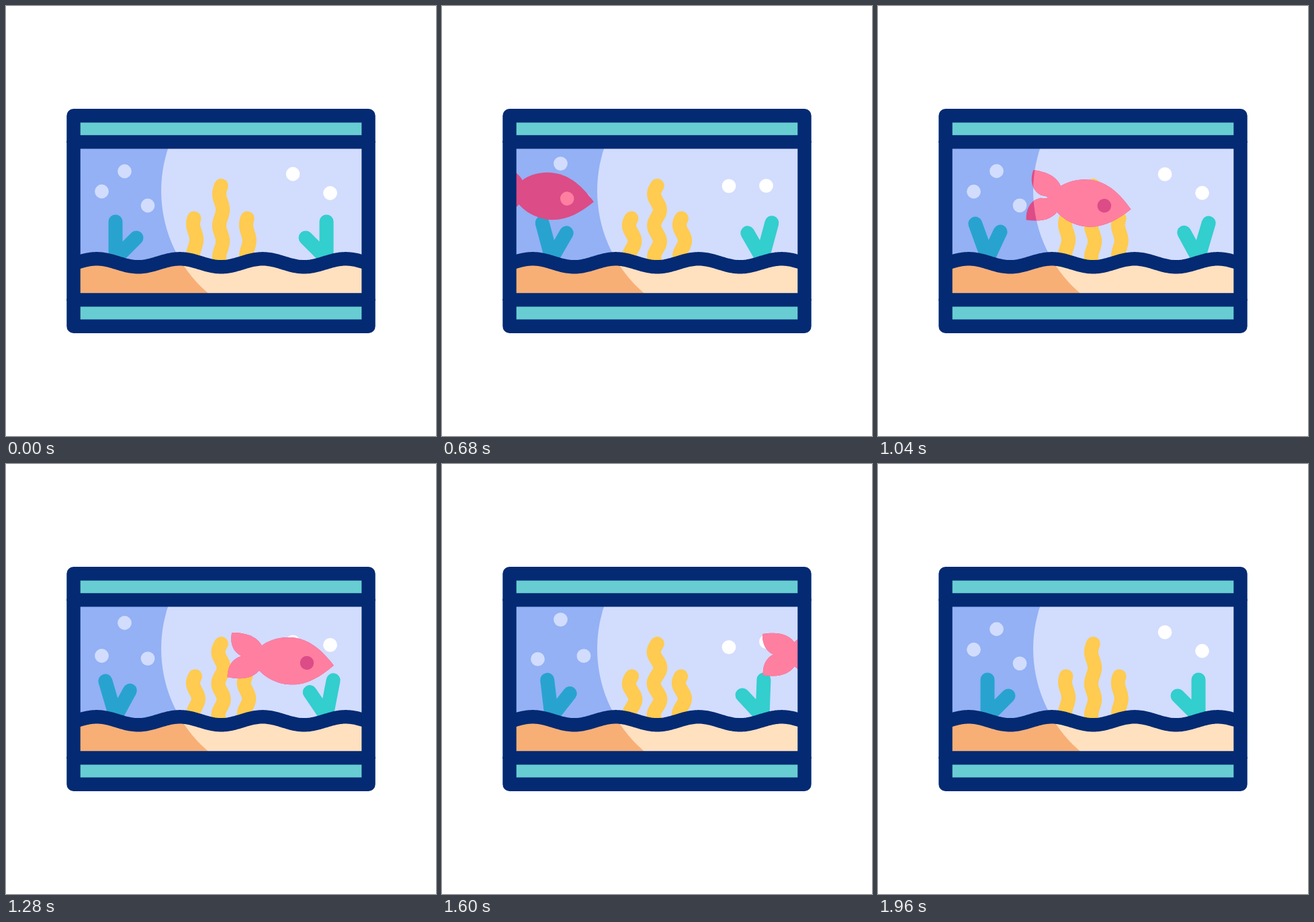
An HTML page with a canvas for the animation above (2 s loop, 640 by 640 pixels).

```html
<!DOCTYPE html>
<html lang="en">
<head>
<meta charset="utf-8">
<title>Aquarium</title>
<style>
html, body { margin: 0; width: 100%; height: 100%; overflow: hidden; background: #fff; }
canvas { display: block; }
</style>
</head>
<body>
<canvas id="stage" width="640" height="640"></canvas>
<script>
const ctx = document.getElementById('stage').getContext('2d');
const NAVY = '#032a73', TEAL = '#68cdd2', KELP = '#ffcb50';
const STEP = 40, STEPS = 50;

// x, rest y, travel, colour
const bubbles = [
  [176.5, 246, -16, '#d2dcfd'],
  [142.5, 276, 16, '#d2dcfd'],
  [211, 297, -12.5, '#d2dcfd'],
  [427, 250, 25, '#fff'],
  [482.5, 278.5, -15.3, '#fff']
];

const body = new Path2D('M60 0C40-21 20-35-5-35C-25-35-42-26-50-18Q-58-10-66 0Q-58 10-50 18C-42 26-25 35-5 35C20 35 40 21 60 0Z');
const lobe = new Path2D('M-95-34C-70-36-55-30-47-15L-40 0L-76 0C-90-4-97-17-95-34Z');

const lightZone = new Path2D();
lightZone.arc(433, 275, 202, 0, 7);

const ground = new Path2D();
for (let x = 96; x <= 544; x += 2) {
  ground.lineTo(x, 382.3 - 6 * Math.cos((x - 135) / 61.75 * Math.PI));
}
const sand = new Path2D(ground);
sand.lineTo(544, 440);
sand.lineTo(96, 440);

// 0 at the ends of a cycle, 1 in the middle
const swing = p => (1 - Math.cos(2 * Math.PI * Math.min(1, Math.max(0, p)))) / 2;
const rad = deg => deg * Math.PI / 180;

function rect(color, x, y, w, h) {
  ctx.fillStyle = color;
  ctx.fillRect(x, y, w, h);
}

function fill(color, path) {
  ctx.fillStyle = color;
  ctx.fill(path);
}

function stroke(color, width, path) {
  ctx.strokeStyle = color;
  ctx.lineWidth = width;
  ctx.stroke(path);
}

function dot(color, x, y, r) {
  const p = new Path2D();
  p.arc(x, y, r, 0, 7);
  fill(color, p);
}

function scoped(draw) {
  ctx.save();
  draw();
  ctx.restore();
}

function inLight(draw) {
  scoped(() => {
    ctx.clip(lightZone);
    draw();
  });
}

function plant(color, x, side, angle) {
  scoped(() => {
    ctx.translate(x, 374.5);
    ctx.scale(side, 1);
    ctx.rotate(rad(-angle));
    stroke(color, 21, new Path2D('M.5-53.5V2M31.5-29.5L.5 1.5'));
  });
}

function kelp(mid, amp, top, cross) {
  const p = new Path2D();
  for (let y = top; y <= 382; y += 2) {
    p.lineTo(mid - amp * Math.sin((y - cross) / 23.5 * Math.PI), y);
  }
  stroke(KELP, 21, p);
}

function fish(n, skin, eye) {
  const x = 428 + 435.9 * Math.sin(0.0429 * (n - 32));
  const y = 294.3 - 0.00028 * (x - 365) ** 2;
  const spread = 5 * Math.cos(2 * Math.PI * n / 25);
  scoped(() => {
    ctx.translate(x, y + 0.5);
    ctx.rotate(rad(8.4 - 0.03 * (n - 22.5) ** 2));
    fill(skin, body);
    for (const side of [1, -1]) {
      scoped(() => {
        ctx.scale(1, side);
        ctx.translate(-50, 0);
        ctx.rotate(rad(spread));
        ctx.translate(50, 0);
        fill(skin, lobe);
      });
    }
    dot(eye, 20, 0.3, 10.3);
  });
}

function tank(n) {
  const u = swing(n % 25 / 25);
  rect('#93b1f4', 100, 200, 440, 240);
  inLight(() => rect('#d2dcfd', 100, 200, 440, 240));

  for (const [x, y, travel, color] of bubbles) dot(color, x, y + travel * u, 10.4);

  kelp(281 + 2.3 * u, 2.5 + 2.5 * u, 316, 312.5 + 3 * u);
  kelp(320, 2.6 + 2.5 * u, 267.5, 268);
  kelp(359.8 - 3.2 * u, 2.4 + 2.4 * u, 316, 314);
  plant('#28a3d0', 162.5, 1, 20 * swing((n - 0.7) / 49));
  plant('#33cece', 477.5, -1, 17.5 * swing(n / 45));

  fill('#f7af76', sand);
  inLight(() => fill('#ffe0bf', sand));
  stroke(NAVY, 20.4, ground);

  fish(n, '#dc4c87', '#ff7fa1');
  inLight(() => fish(n, '#ff7fa1', '#dc4c87'));
}

function frame() {
  rect(TEAL, 100, 163, 440, 40);
  rect(TEAL, 100, 437, 440, 40);
  stroke(NAVY, 20.4, new Path2D('M100.2 202.4H539.8M100.2 437.4H539.8M100.5 163.2H539.5V476.8H100.5Z'));
}

function render() {
  const n = Math.floor(performance.now() / STEP) % STEPS;
  rect('#fff', 0, 0, 640, 640);
  ctx.lineCap = ctx.lineJoin = 'round';
  scoped(() => {
    ctx.beginPath();
    ctx.rect(100, 202, 440, 236);
    ctx.clip();
    tank(n);
  });
  frame();
  requestAnimationFrame(render);
}
render();
</script>
</body>
</html>
```
